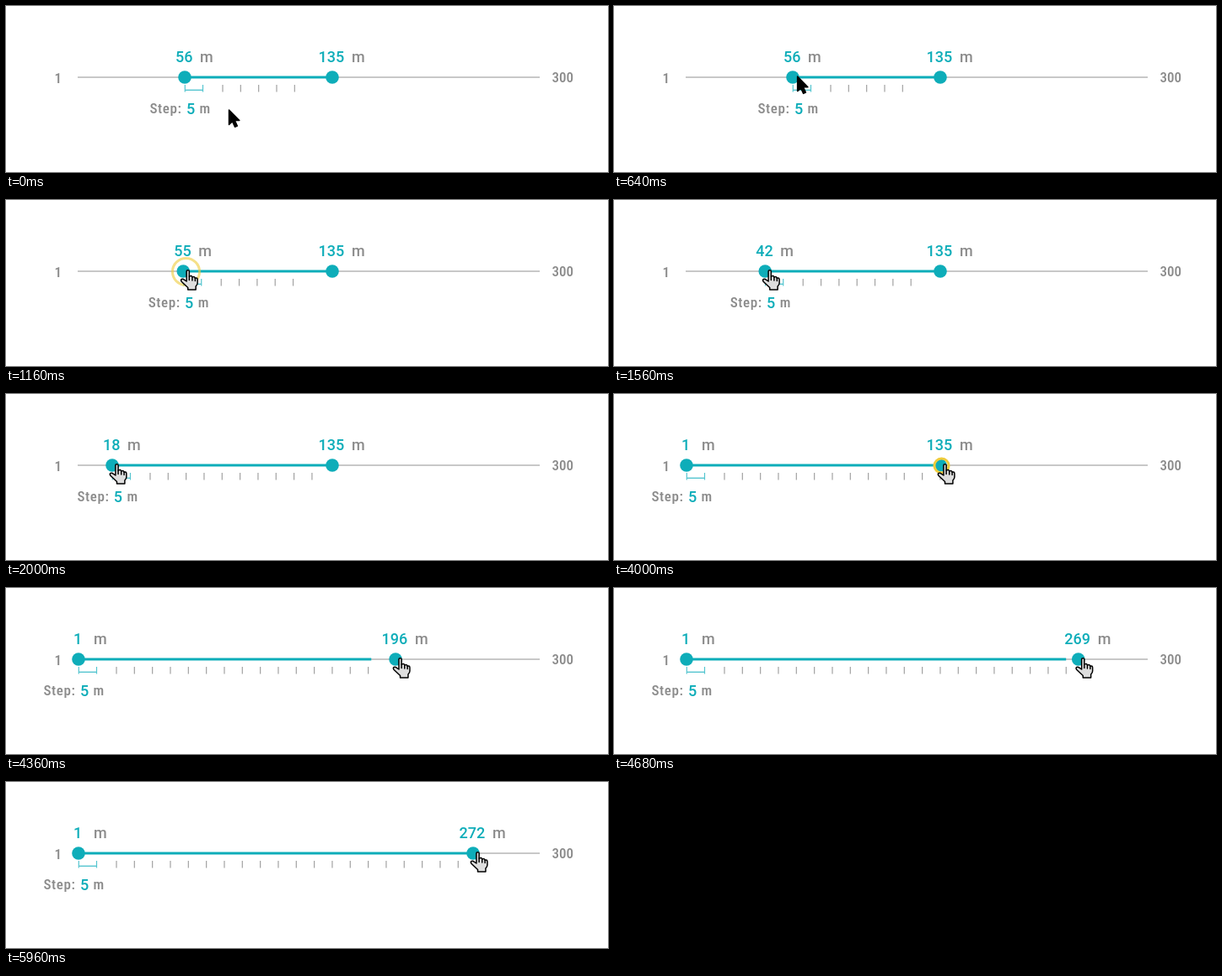
An HTML page with a canvas for the animation above (6 s loop, 714x198 px).

```html
<!DOCTYPE html>
<html lang="en">
<head>
<meta charset="utf-8">
<title>Range slider</title>
<style>
  html, body { margin: 0; width: 100%; height: 100%; overflow: hidden; background: #fff; }
  canvas { display: block; width: 714px; height: 198px; }
</style>
</head>
<body>
<canvas id="stage" width="714" height="198"></canvas>
<script>
const ctx = document.getElementById('stage').getContext('2d');
const LOOP = 6000, AXIS = 85;
const TEAL = '#0eadb9', GREY = '#8b8b8b';
const WIDE = '500 18px Roboto, sans-serif';
const NARROW = '500 condensed 17px "Roboto Condensed", Roboto, sans-serif';
const LOW = { from: 212, to: 86, press: 920, start: 1055, end: 2570 };
const HIGH = { from: 387, to: 554, press: 3880, start: 4030, end: 4740 };

const mix = (a, b, k) => a + (b - a) * k;
function ease(t, start, end) {
  const k = Math.min(1, Math.max(0, (t - start) / (end - start)));
  return k * k * (3 - 2 * k);
}
const knobAt = (knob, t) => mix(knob.from, knob.to, ease(t, knob.start, knob.end));

function line(x1, y1, x2, y2, color, width) {
  ctx.strokeStyle = color;
  ctx.lineWidth = width;
  ctx.beginPath();
  ctx.moveTo(x1, y1);
  ctx.lineTo(x2, y2);
  ctx.stroke();
}

function dot(x) {
  ctx.fillStyle = TEAL;
  ctx.beginPath();
  ctx.arc(x, AXIS, 7.8, 0, Math.PI * 2);
  ctx.fill();
}

function text(str, x, y, color, font, align = 'left', spacing = 0) {
  ctx.font = font;
  ctx.letterSpacing = spacing + 'px';
  ctx.fillStyle = color;
  ctx.textAlign = align;
  ctx.fillText(str, x, y);
}

function ticks(low, limit) {
  const left = low + 0.3, right = low + 21.5;
  line(left, 94, left, 102.5, '#55c5cf', 1.2);
  line(right, 94, right, 102.5, '#55c5cf', 1.2);
  line(left, 100.3, right, 100.3, '#55c5cf', 1.4);
  for (let x = low + 45; x <= limit; x += 21.33) {
    line(x, 94, x, 102.5, '#a2a2a2', 1.2);
  }
}

function ripple(t, knob) {
  const age = t - knob.press;
  if (age < 0 || age > 380) return;
  ctx.globalAlpha = Math.min(1, (380 - age) / 230);
  ctx.strokeStyle = '#efcc3c';
  ctx.lineWidth = 3;
  ctx.beginPath();
  ctx.arc(knob.from + 1.5, AXIS + 0.5, 1 + age / 16, 0, Math.PI * 2);
  ctx.stroke();
  ctx.globalAlpha = 1;
}

function shape(x, y, path, fill, stroke) {
  ctx.save();
  ctx.translate(x, y);
  ctx.lineJoin = ctx.lineCap = 'round';
  ctx.fillStyle = fill;
  ctx.fill(path);
  ctx.strokeStyle = stroke;
  ctx.lineWidth = 1.5;
  ctx.stroke(path);
  ctx.restore();
}

const arrow = new Path2D('M0.5 1V18.5L4.5 14.8L7.5 21.3L10.3 20L7.4 13.6H12.8Z');
const hand = new Path2D(
  'M-1.6 14V2Q-1.6 0.7 0 0.7Q1.6 0.7 1.6 2V8Q4.6 6.6 5.2 9Q8 7.8 8.6 10.2' +
  'Q11.4 9.4 11.4 12V16Q11.4 18 9.4 20V24H0V21.5L-7.4 14.5' +
  'Q-9 12.4 -7.4 11.5Q-5.8 10.7 -4 12.4Z');
const fingers = new Path2D('M1.6 8V12.6M5.2 9V13M8.6 10.2V13.6');

function cursor(t, low, high) {
  let x, y = 83, over = true;
  if (t < 680) {
    const k = ease(t, 20, 660);
    x = mix(264, 217, k);
    y = mix(123, 83, k);
    over = t >= 660;
  } else if (t < 2880) {
    x = low + 5.5;
  } else if (t < 3500) {
    const k = ease(t, 2860, 3480);
    x = mix(LOW.to, HIGH.from, k) + 5.5;
    y += 12 * Math.sin(Math.PI * k);
    over = x < LOW.to + 9 || x > HIGH.from - 8;
  } else {
    x = high + 5.5;
  }
  if (!over) return shape(x, y, arrow, '#000', '#000');
  shape(x, y, hand, '#dedede', '#000');
  shape(x, y, fingers, 'transparent', '#000');
}

function draw(t) {
  const low = knobAt(LOW, t), high = knobAt(HIGH, t);
  const barEnd = knobAt(HIGH, t - 85);
  const lowValue = Math.round(1 + (low - 86) / 2.29);
  const highValue = Math.floor(135 + (high - 387) * 137 / 167 + 0.01);

  ctx.fillStyle = '#fff';
  ctx.fillRect(0, 0, 714, 198);

  line(85, AXIS, 633, AXIS, '#b6b6b6', 1.6);
  line(low, AXIS, barEnd, AXIS, TEAL, 3);
  const gap = 32 * Math.min(1, Math.max(0, (low - 86) / 92));
  ticks(low, barEnd + 1 - gap);
  dot(low);
  dot(high);

  text('1', 57.5, 91.5, GREY, NARROW);
  text('300', 647.5, 91, GREY, NARROW);
  text(lowValue, low - 0.8, 67, TEAL, WIDE, 'center');
  text('m', low + 18, 67, GREY, WIDE);
  text(highValue, high - 1.2, 67, TEAL, WIDE, 'center');
  text('m', high + 23, 67, GREY, WIDE);
  text('Step:', low - 41.5, 128, GREY, NARROW, 'left', 0.6);
  text('5', low + 7, 129, TEAL, WIDE, 'center');
  text('m', low + 17.5, 128, GREY, NARROW);

  ripple(t, LOW);
  ripple(t, HIGH);
  cursor(t, low, high);
}

const begin = performance.now();
function frame() {
  draw((performance.now() - begin) % LOOP);
  requestAnimationFrame(frame);
}
frame();
</script>
</body>
</html>
```
